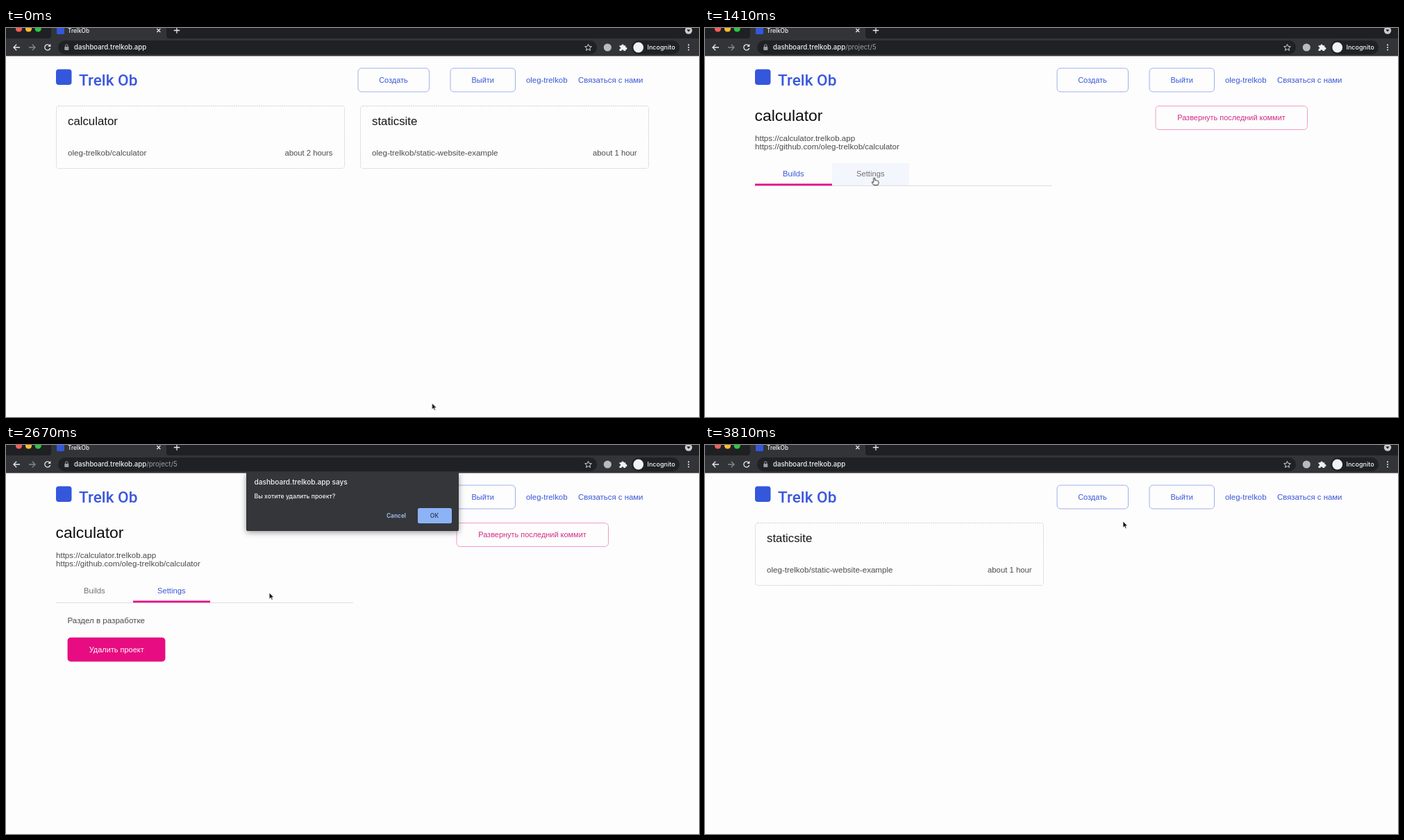
Write an HTML page that moves like this. It is 998 by 561 pixels and loops after 3.84 s.

```html
<!DOCTYPE html>
<html lang="ru">
<head>
<meta charset="utf-8">
<title>Dashboard</title>
<style>
html, body { margin: 0; width: 100%; height: 100%; overflow: hidden; background: #fdfdfd; }
svg { position: absolute; left: 0; top: 0; overflow: visible; }
text { font: 11.58px "Liberation Sans", Arial, sans-serif; fill: #4c4c50; white-space: pre; }
.ui text { font-family: Inter, Roboto, sans-serif; font-weight: 500; fill: #f1f3f4; }
.ui .url { font-size: 9.65px; }
.ui .path { font-weight: 400; fill: #9aa0a6; }

text.nav { font-size: 11.4px; fill: #3a57d8; }
text.btn { font-size: 10.95px; text-anchor: middle; fill: #3a57d8; }
text.btn.pink { fill: #d42a86; }
text.title { font-size: 16.8px; fill: #161616; }
text.heading { font-size: 22.9px; fill: #0c0c0c; }
text.age { font-size: 11.3px; text-anchor: end; }
text.tab { font-size: 11.2px; text-anchor: middle; }
text.brand { font: 500 22.6px Roboto, sans-serif; fill: #3b57dc; }
.outline { fill: none; stroke: #9db2ee; }
.outline.pink { stroke: #f09cc8; }
.card { fill: none; stroke: #cfd3e2; stroke-dasharray: 2 1; }

/* Hard switches between screens and states */
.step { animation: 3840ms step-end infinite; }
.home { animation-name: home; }
.project { animation-name: project; }
.rest { animation-name: rest; }
.settings { animation-name: settings; }
.builds-tab { animation-name: builds-tab; }
.settings-tab { animation-name: settings-tab; }
.tint { animation-name: tint; }
.hand { animation-name: hand; }
.arrow { animation-name: arrow; }
@keyframes home { 0% { opacity: 1 } 21.09%, 100% { opacity: 0 } }
@keyframes project { 0% { opacity: 0 } 21.09% { opacity: 1 } 89.84%, 100% { opacity: 0 } }
@keyframes rest { 0% { opacity: 0 } 89.84%, 100% { opacity: 1 } }
@keyframes settings { 0% { opacity: 0 } 39.06%, 100% { opacity: 1 } }
@keyframes builds-tab { 0% { fill: #3a57d8 } 39.06%, 100% { fill: #707074 } }
@keyframes settings-tab { 0% { fill: #707074 } 39.06%, 100% { fill: #3a57d8 } }
@keyframes tint { 0% { opacity: 0 } 35.94% { opacity: 1 } 49.2%, 100% { opacity: 0 } }
@keyframes hand { 0% { opacity: 0 } 17.19% { opacity: 1 } 31.25% { opacity: 0 } 35.94% { opacity: 1 } 49.2%, 100% { opacity: 0 } }
@keyframes arrow { 0% { opacity: 1 } 17.19% { opacity: 0 } 31.25% { opacity: 1 } 35.94% { opacity: 0 } 49.2%, 100% { opacity: 1 } }

.marker { animation: marker 3840ms ease-in-out infinite; }
@keyframes marker { 0%, 39.06% { transform: none } 42.2%, 100% { transform: translateX(111px) } }

.fill { animation: fill 3840ms linear infinite; }
@keyframes fill { 0%, 53.9% { opacity: 0 } 57%, 82% { opacity: 1 } 85.2%, 100% { opacity: 0 } }
text.delete { animation: label 3840ms linear infinite; }
@keyframes label { 0%, 53.9% { fill: #d42a86 } 57%, 82% { fill: #fff } 83.4%, 100% { fill: #d42a86 } }
.ripple { transform-origin: 212px 296px; animation: ripple 3840ms linear infinite; }
@keyframes ripple {
  0%, 57.8% { transform: scale(0); opacity: .25 }
  62.74% { transform: scale(1); opacity: .25 }
  65.6%, 100% { transform: scale(1); opacity: 0 }
}

#dialog {
  left: 346px; top: 40px; transform-origin: 50% 0;
  filter: drop-shadow(0 2px 4px #0006);
  animation: dialog 3840ms linear infinite;
}
@keyframes dialog {
  0%, 64.06% { transform: perspective(800px) rotateX(20deg); opacity: 0 }
  66.4%, 78.9% { transform: perspective(800px) rotateX(0deg); opacity: 1 }
  79.69% { transform: perspective(800px) rotateX(7deg); opacity: .85 }
  81.25%, 100% { transform: perspective(800px) rotateX(20deg); opacity: 0 }
}

.cursor { animation: cursor 3840ms ease-in-out infinite; }
@keyframes cursor {
  0%, 7.8% { transform: translate(613.5px, 541px); animation-timing-function: ease-in }
  14.06% { transform: translate(575px, 454px); animation-timing-function: ease-out }
  18%, 30.5% { transform: translate(397px, 121px) }
  36.7%, 47.7% { transform: translate(243.7px, 216px) }
  55.5%, 65.6% { transform: translate(210px, 291px) }
  74.2%, 100% { transform: translate(602px, 110px) }
}
</style>
</head>
<body>
<svg width="998" height="561" viewBox="0 0 998 561">
  <defs>
    <clipPath id="delete-shape"><rect x="88.5" y="277.5" width="141" height="35" rx="5"/></clipPath>
    <g id="static-card">
      <rect class="card" x="72.5" y="112.5" width="415" height="90" rx="3.5"/>
      <text class="title" x="89" y="140">staticsite</text>
      <text x="89" y="183.7">oleg-trelkob/static-website-example</text>
      <text class="age" x="470.5" y="183.7">about 1 hour</text>
    </g>
  </defs>

  <rect x="72" y="59.5" width="22.5" height="22.5" rx="4" fill="#3457dc"/>
  <text class="brand" x="105" y="82.5">Trelk Ob</text>
  <rect class="outline" x="507" y="58" width="102.5" height="34" rx="5"/>
  <text class="btn" x="558" y="78.6">Создать</text>
  <rect class="outline" x="640" y="58" width="93.5" height="34" rx="5"/>
  <text class="btn" x="686.7" y="78.6">Выйти</text>
  <text class="nav" x="749" y="78.6">oleg-trelkob</text>
  <text class="nav" x="824" y="78.6">Связаться с нами</text>

  <g class="step home">
    <rect class="card" x="72.5" y="112.5" width="415" height="90" rx="3.5"/>
    <text class="title" x="89" y="140">calculator</text>
    <text x="89" y="183.7">oleg-trelkob/calculator</text>
    <text class="age" x="470.5" y="183.7">about 2 hours</text>
    <use href="#static-card" x="438"/>
  </g>
  <g class="step rest"><use href="#static-card"/></g>

  <g class="step project">
    <text class="heading" x="71.5" y="134">calculator</text>
    <text x="72" y="162.8">https://calculator.trelkob.app</text>
    <text x="72" y="175.3">https://github.com/oleg-trelkob/calculator</text>
    <rect class="outline pink" x="649" y="112.5" width="218.5" height="34" rx="5"/>
    <text class="btn pink" x="758" y="133.2">Развернуть последний коммит</text>

    <rect class="step tint" x="183" y="195" width="111" height="32" fill="#f3f6fd"/>
    <path d="M72 227.5H499" stroke="#bdbdbd" stroke-dasharray="1 1"/>
    <text class="tab step builds-tab" x="127.3" y="214.3">Builds</text>
    <text class="tab step settings-tab" x="238.3" y="214.3">Settings</text>
    <rect class="marker" x="72" y="224.5" width="111" height="2.8" fill="#e6128a"/>

    <g class="step settings">
      <text x="88.5" y="256.5">Раздел в разработке</text>
      <rect class="outline pink" x="89" y="278" width="140" height="34" rx="5"/>
      <g clip-path="url(#delete-shape)">
        <rect class="fill" x="88.5" y="277.5" width="141" height="35" fill="#e80c82"/>
        <circle class="ripple" cx="212" cy="296" r="124" fill="#fff"/>
      </g>
      <text class="btn delete" x="159.2" y="298.8">Удалить проект</text>
    </g>
  </g>
</svg>

<svg id="dialog" class="ui" width="306" height="84" viewBox="346 40 306 84">
  <path d="M346 40h306v82q0 2-2 2h-302q-2 0-2-2z" fill="#35363a"/>
  <text x="357.5" y="56.5" font-size="10.1" style="font-size:10.1px">dashboard.trelkob.app says</text>
  <text x="357.5" y="76.5" style="font-size:8.7px">Вы хотите удалить проект?</text>
  <text x="562" y="104.5" text-anchor="middle" style="font-size:8.4px;font-weight:600;fill:#a4c2f4">Cancel</text>
  <rect x="593" y="91" width="49" height="22" rx="2.5" fill="#8cb3f6"/>
  <text x="617" y="104.5" text-anchor="middle" style="font-size:8.4px;font-weight:600;fill:#35435c">OK</text>
</svg>

<svg class="ui" width="998" height="561" viewBox="0 0 998 561">
  <rect width="998" height="40.5" fill="#323438"/>
  <path d="M0 0H65V11Q65 15 61 15H0zM231 0H998V15H235Q231 15 231 11z" fill="#1f2023"/>
  <circle cx="18.5" cy="1" r="4.6" fill="#fb5d56"/>
  <circle cx="32.5" cy="1" r="4.6" fill="#fbbd2e"/>
  <circle cx="46.2" cy="1" r="4.6" fill="#2bc840"/>
  <rect x="73" y="-2" width="11" height="11" rx="1.5" fill="#3457dc"/>
  <text x="89" y="6.5" style="font-size:8.3px">TrelkOb</text>
  <g fill="none" stroke="#e8eaed" stroke-width="1.3">
    <path d="M217.3 1l5 5m0-5l-5 5M241.8 3.5h8.4m-4.2-4.2v8.4"/>
    <path d="M20 28H11m4.2-4.2L11 28l4.2 4.2"/>
    <path d="M33 28h9m-4.2-4.2L42 28l-4.2 4.2" stroke="#85888c"/>
    <path d="M62.8 25.2a4 4 0 1 0 .9 3.8"/>
  </g>
  <path d="M64.3 23v4h-4z" fill="#e8eaed"/>
  <circle cx="983" cy="3.5" r="5.2" fill="#c9cbce"/>
  <path d="M980.3 2.2h5.4l-2.7 3.2z" fill="#1f2023"/>

  <rect x="75" y="18" width="776" height="20" rx="10" fill="#202124"/>
  <rect x="84.3" y="27" width="6" height="5" rx=".8" fill="#9aa0a6"/>
  <path d="M85.6 27v-1.5a1.7 1.7 0 0 1 3.4 0V27" fill="none" stroke="#9aa0a6"/>
  <text class="url" x="98" y="31.3">dashboard.trelkob.app<tspan class="url path step project">/project/5</tspan></text>
  <path d="M838.5 23.4l1.4 3.1 3.4.3-2.6 2.3.8 3.3-3-1.8-3 1.8.8-3.3-2.6-2.3 3.4-.3z" fill="none" stroke="#d5d7da"/>

  <circle cx="866.3" cy="28" r="5.6" fill="#b9bbbe"/>
  <path d="M883.5 25.2h2.8a1.7 1.7 0 1 1 3.4 0h2.6v2.6a1.7 1.7 0 1 1 0 3.3v1.8h-2.8a1.6 1.6 0 0 0-3.2 0h-2.8v-2.6a1.6 1.6 0 0 0 0-3.2z" fill="#f1f3f4"/>
  <rect x="901" y="18" width="69" height="20" rx="10" fill="#202124"/>
  <circle cx="910.7" cy="28" r="7.4" fill="#f1f3f4"/>
  <text x="923.5" y="31.3" style="font-size:9px">Incognito</text>
  <path d="M983 24.3v.1m0 3.5v.1m0 3.5v.1" stroke="#e8eaed" stroke-width="2" stroke-linecap="round"/>

  <g class="cursor" stroke-linejoin="round">
    <path class="step arrow" d="M0 0V9.2L2.1 7.3 3.6 10.6 5.1 9.9 3.7 6.8H6.5z" fill="#111" stroke="#fff" stroke-width=".7"/>
    <path class="step hand" d="M-1 .6Q0-.6 1 .6V3.6Q2.4 2.8 2.8 4 4.2 3.4 4.6 4.6 6 4.2 6.2 5.4V8L5.2 10.6H-.8L-3.4 6.8Q-3.6 5-1 6.6z" fill="#fff" stroke="#222" stroke-width=".95"/>
  </g>
</svg>
</body>
</html>
```
